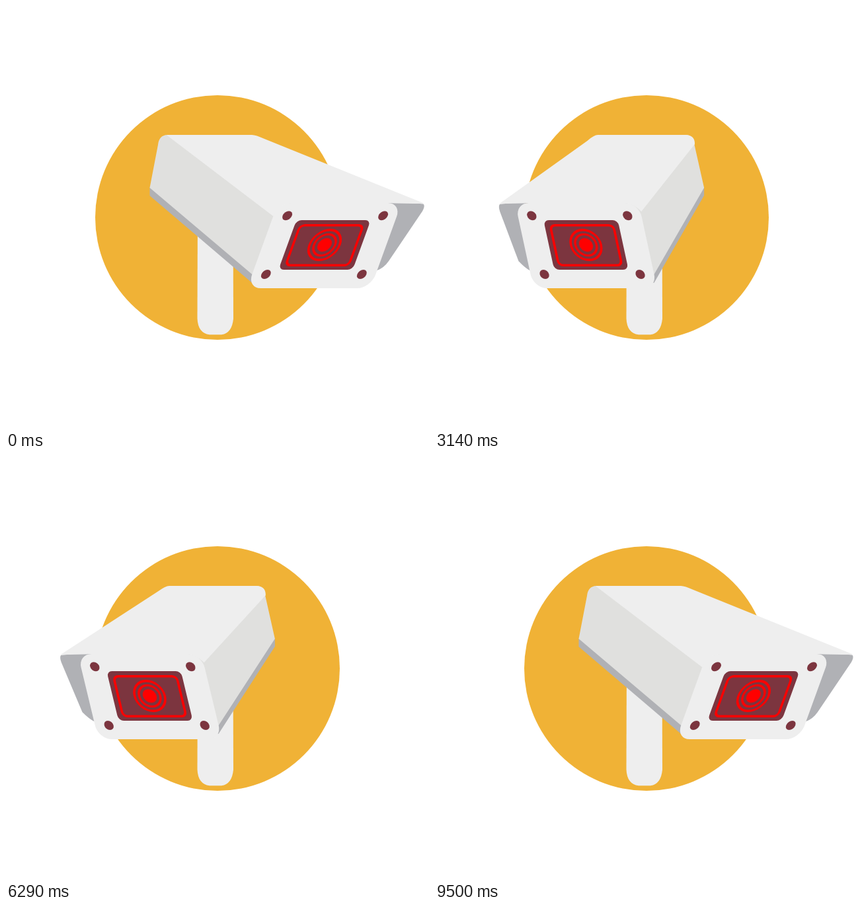
These frames come from a looping animation (640x640 px, 9.57 s). An HTML page with a canvas:

```html
<!DOCTYPE html>
<html>
<head>
<meta charset="utf-8">
<title>Security camera</title>
<style>
html, body { margin: 0; width: 100%; height: 100%; overflow: hidden; background: #fff; }
canvas { display: block; width: 100vw; height: 100vh; }
</style>
</head>
<body>
<canvas id="stage" width="640" height="640"></canvas>
<script>
const ctx = document.getElementById('stage').getContext('2d');
const LOOP = 9570, FPS = 14;
const AMBER = '#f0b236', LIGHT = '#eeeeee', SIDE = '#e0e0de', GREY = '#b0b1b5', WINE = '#7c353f', RED = '#ff0000';
const MID_Y = 361.5, HALF = 93.5;

// Symmetric cubic ease with handles of length a.
function ease(x) {
  const a = 0.51;
  if (x <= 0) return 0;
  if (x >= 1) return 1;
  let lo = 0, hi = 1;
  for (let i = 0; i < 24; i++) {
    const u = (lo + hi) / 2, v = 1 - u;
    if (3 * a * u * v * v + 3 * (1 - a) * u * u * v + u * u * u < x) lo = u; else hi = u;
  }
  return lo * lo * (3 - 2 * lo);
}

// Horizontal centre of the camera face.
function faceX(t) {
  const turn = t < 4770 ? ease(t / 4740) : 1 - ease((t - 4800) / 4771);
  return 482 - 319 * turn;
}

// Each point is [x, y], or [controlX, controlY, x, y] for a curve.
function shape(color, points) {
  ctx.fillStyle = color;
  ctx.beginPath();
  points.forEach((p, i) => {
    if (p.length === 4) ctx.quadraticCurveTo(...p);
    else if (i) ctx.lineTo(...p);
    else ctx.moveTo(...p);
  });
  ctx.closePath();
  ctx.fill();
}

function disc(x, y, r, color) {
  ctx.fillStyle = color;
  ctx.beginPath();
  ctx.arc(x, y, r, 0, Math.PI * 2);
  ctx.fill();
}

function ring(r, width) {
  ctx.lineWidth = width;
  ctx.beginPath();
  ctx.arc(0, 0, r, 0, Math.PI * 2);
  ctx.stroke();
}

function box(halfW, top, bottom, r) {
  ctx.beginPath();
  ctx.roundRect(-halfW, top - MID_Y, halfW * 2, bottom - top, r);
}

function drawFace(c, skew) {
  ctx.save();
  ctx.transform(1, 0, -skew, 1, c, MID_Y);
  ctx.fillStyle = LIGHT;
  box(HALF, 298, 427, 20.5);
  ctx.fill();
  for (const x of [-72.5, 72.5]) for (const y of [-44.3, 44.5]) disc(x, y, 7, WINE);
  ctx.fillStyle = WINE;
  box(56.2, 324, 399, 8);
  ctx.fill();
  ctx.strokeStyle = RED;
  ctx.lineWidth = 3.6;
  box(47.8, 331.7, 392.2, 7);
  ctx.stroke();
  ring(22.8, 3.4);
  ring(16, 3.2);
  disc(0, 0, 10.3, RED);
  ctx.restore();
}

function drawBody(c, d) {
  const right = d >= 0;
  const far = right ? 1 : -1;
  const m = Math.abs(d), n = 1 - Math.min(m, 1);
  const skew = 0.363 * d;
  const edge = (y, side) => c + side * HALF + skew * (MID_Y - y);
  const rim = side => [c + side * 73 + skew * 63.5, 298];

  // Far side of the hood
  const tipX = c + far * ((right ? 98.2 : 102) + 47 * m + 5.8 * m * m);
  const tipY = 299.5 + 14 * n ** 4;
  const lowX = c + far * (right ? 97 : 102);
  shape(GREY, [
    rim(far),
    [tipX - far * 7, 298.5, tipX - far * 1.5, tipY],
    [tipX + far * 1.5 * m, tipY + 3, tipX - far * 3 * m, tipY + 11],
    [lowX, 386],
    [c + far * (96 - 6 * m), 396, edge(400, far), 400],
    [c, 400]
  ]);

  // Near side wall and its underside
  const wallX = right ? 227.2 - 9.7 * d : 409.5 + 4 * d;
  const frontX = edge(406, -far);
  const drop = 12 * (1 - n ** 4);
  if (right) shape(GREY, [[wallX, 275], [c - 103, 385], [c - 93, 407], [c, 380]]);
  shape(GREY, [
    [wallX, 274], [wallX, 275 + drop], [frontX, 407 + drop], [frontX - far * -8, 419], [frontX + far * 8, 400]
  ]);
  const kneeX = right ? 230 : 392 + 4.5 * n * n;
  const kneeY = right ? 210 : 211;
  const backX = right ? 244 : 378 + 5 * n;
  shape(SIDE, [
    [wallX, 275], [kneeX, kneeY],
    [kneeX + far * 1.5, 195.5, backX, 195],
    rim(-far), [c, 380], [frontX + far * 4, 406], [frontX, 406]
  ]);

  // Top surface
  const foldX = right ? 230.5 + 17.5 * d - 4 * d * d : 392 + 2.5 * n;
  const foldY = right ? 212 - 16 * m ** 3 : 211 - 5 * n;
  const over = (right ? 11 : 4.5) * n ** 1.5;
  const cornerY = right ? 318 : 311;
  const cornerX = edge(cornerY, -far) - far * over;
  const mirror = x => right ? x : 622 - x;
  const joinX = right ? 391 + 8 * n ** 3 : 231 - 3 * n ** 3;
  shape(LIGHT, [
    [backX, 195],
    [mirror(372 + 9 * n), 195],
    [mirror(378 + 8 * n), 195, joinX, 201 + (right ? 18 : 16) * n * n],
    [tipX - far * 2 * m, tipY - 1.5 * m],
    [tipX - far * 1.5, tipY],
    [tipX - far * 7, 298.5, ...rim(far)],
    [c, 330],
    rim(-far),
    [cornerX + far * (3 + 12 * m), 300, cornerX, cornerY],
    [foldX, foldY],
    [foldX - far * (right ? 1 : 0.5), 196, backX, 195]
  ]);

  drawFace(c, skew);
}

function draw(t) {
  ctx.fillStyle = '#fff';
  ctx.fillRect(0, 0, 640, 640);
  disc(320, 320, 185, AMBER);
  shape(LIGHT, [
    [290, 300], [289.5, 473], [290.5, 495, 308, 497.3],
    [326, 497.3], [342, 495, 344, 473], [343.5, 300]
  ]);
  const c = faceX(t);
  drawBody(c, (c - 323) / 159);
}

const start = performance.now();
function tick() {
  const t = (performance.now() - start) % LOOP;
  draw(Math.floor((t + 5) * FPS / 1000) * 1000 / FPS);
  requestAnimationFrame(tick);
}
tick();
</script>
</body>
</html>
```
